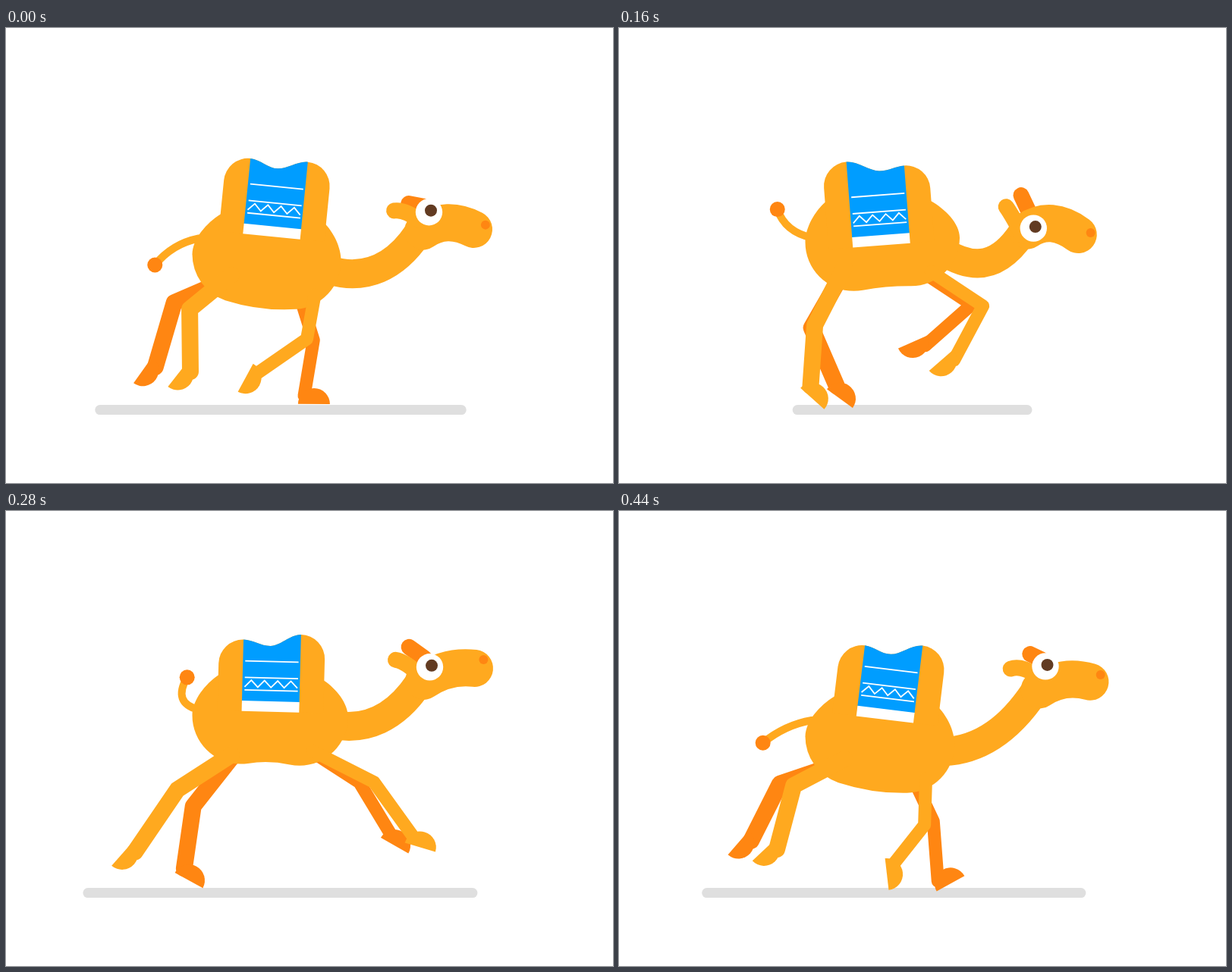
These frames come from a looping animation (800x600 px, 0.48 s). An HTML page with a canvas:

```html
<!DOCTYPE html>
<html lang="en">
<head>
<meta charset="utf-8">
<title>Running camel</title>
<style>
html, body { margin: 0; width: 100%; height: 100%; overflow: hidden; background: #fff; }
canvas { display: block; }
</style>
</head>
<body>
<canvas id="stage" width="800" height="600"></canvas>
<script>
const ctx = document.getElementById('stage').getContext('2d');
const SAND = '#ffa91f', DARK = '#ff8612', BLUE = '#009dff', GREY = '#dfdfdf', BROWN = '#623b22';
const LOOP = 480, STEP = 40, RAD = Math.PI / 180;
let phase = 0;

// Cyclic motion: a mean, then cosine and sine amounts of each harmonic.
const wave = (mean, ...amounts) => amounts.reduce((sum, amount, i) =>
  sum + amount * (i % 2 ? Math.sin : Math.cos)(phase * (1 + (i >> 1))), mean);

function stroke(color, width, trace) {
  ctx.strokeStyle = color;
  ctx.lineWidth = width;
  ctx.beginPath();
  trace();
  ctx.stroke();
}

function fill(color, trace) {
  ctx.fillStyle = color;
  ctx.beginPath();
  trace();
  ctx.fill();
}

const line = (color, width, ...p) => stroke(color, width, () => {
  for (let i = 0; i < p.length; i += 2) ctx.lineTo(p[i], p[i + 1]);
});
const bend = (color, width, x, y, ...rest) => stroke(color, width, () => {
  ctx.moveTo(x, y);
  ctx.quadraticCurveTo(...rest);
});
const dot = (color, x, y, r) => fill(color, () => ctx.arc(x, y, r, 0, 7));

// The trunk carries every other part.
function trunk() {
  const tilt = wave(2.3, 4.25, -4.65, -.85, 1.1);
  const rearY = wave(290, 13.5, -6, -5, -2.6, 0, 7);
  return {
    tilt, a: tilt * RAD,
    lx: 309.5, ly: rearY,
    rx: wave(382.5, -5), ry: rearY + 1.5 * tilt,
    sag: wave(0, 7),
    clothX: 310 + .4 * tilt,
    clothY: wave(275.3, -3, 7.4, -1, -6.8, 0, 4)
  };
}

function body({ a, lx, ly, rx, ry, sag, clothX, clothY }) {
  const R = 64, slope = Math.atan2(ry - ly, rx - lx), dip = sag / 35;
  const left = lx - R, right = rx + R;
  const ay = ly - 53, by = ry - 48;
  const ax = clothX - 32 + (clothY - ay) * Math.sin(a);
  const bx = clothX + 107.7 + (clothY - by) * Math.sin(a);
  const down = Math.PI / 2 + slope;
  fill(SAND, () => {
    ctx.arc(lx, ly, R, Math.PI, down + dip, true);
    ctx.quadraticCurveTo((lx + rx) / 2 - R * Math.sin(slope), (ly + ry) / 2 + R + sag,
      rx + R * Math.cos(down - dip), ry + R * Math.sin(down - dip));
    ctx.arc(rx, ry, R, down - dip, 0, true);
    ctx.bezierCurveTo(right, ry - .38 * (ry - by),
      bx + .5 * (right - bx), by + .22 * (ry - by), bx, by);
    ctx.lineTo(ax, ay);
    ctx.bezierCurveTo(ax + .5 * (left - ax), ay + .22 * (ly - ay),
      left, ly - .38 * (ly - ay), left, ly);
  });
}

function humps({ a, clothX, clothY }) {
  const W = 75.7, H = 102.7, R = 32;
  const h = wave(98.5, -3.9, 14.3, 5.25, -3.6);
  const dx = 37 + .35 * (h - 98), dy = 89 + .6 * (h - 98);
  const k = 13, lift = k * Math.sin(a);
  const saddle = () => {
    ctx.lineTo(0, -h);
    ctx.bezierCurveTo(dx * .35, -h, dx - k, lift - dy, dx, -dy);
    ctx.bezierCurveTo(dx + k, -dy - lift, W - .35 * (W - dx), -H, W, -H);
  };
  ctx.save();
  ctx.translate(clothX, clothY);
  ctx.rotate(a);
  fill(SAND, () => {
    ctx.moveTo(-R, 0);
    ctx.arc(0, R - h, R, Math.PI, 1.5 * Math.PI);
    saddle();
    ctx.arc(W, R - H, R, -Math.PI / 2, 0);
    ctx.lineTo(W + R, 0);
  });
  fill(BLUE, () => {
    saddle();
    ctx.lineTo(W, -13);
    ctx.lineTo(0, -13);
  });
  fill('#fff', () => ctx.rect(0, -13.7, W, 13.7));
  ctx.lineCap = 'butt';
  ctx.lineJoin = 'miter';
  for (const v of [66.3, 44.5, 28]) line('#fff', 1.8, 3, -v, 73.3, -v);
  stroke('#fff', 1.8, () => {
    for (let i = 0; i < 9; i++) ctx.lineTo(3 + i * 8.7, i % 2 ? -41 : -32);
  });
  ctx.restore();
}

function tail({ ly }) {
  const y = ly + wave(-13, -8, 3);
  const x = wave(205.7, -26.4, 0, 17, 1.9), ballY = wave(265, 52.4, 0, -4.9, 2.5);
  bend(SAND, 10, 254, y, 219, y + .2 * (ballY - y), x, ballY);
  dot(DARK, x, ballY, 10);
}

function head({ ry }) {
  const sx = wave(614.5, 2, -9.5), sy = wave(245.3, 18.7, 51.4, 1.5, 8.4, 0, 4);
  const nod = wave(-6, 3.6, 15.4);
  const jx = sx - 67, jy = sy - nod;
  const ex = sx - 59, ey = sy - wave(12, 10.8, 2);

  const farTurn = wave(41.5, -9.5, 14.7, -9.5, -6.6, 0, -12) * RAD, farLen = wave(36, -7, 8);
  const fx = -farLen * Math.cos(farTurn), fy = -farLen * Math.sin(farTurn);
  line(DARK, 21, ex + fx, ey + fy, ex + .3 * fx + 1, ey + .3 * fy - 4);

  const base = ry + wave(13, 0, 7), rise = jy - base;
  stroke(SAND, 38, () => {
    ctx.moveTo(428, base);
    ctx.bezierCurveTo(463 - .2 * rise, base + 40 + .52 * rise, jx - 37, jy + 48, jx - 7, jy + 3.5);
  });
  bend(SAND, 49, jx, jy, jx + 31, jy - 21, sx, sy);

  const turn = wave(18.5, -4.8, 17.6, -11.5, 4.3) * RAD;
  const nx = -46 * Math.cos(turn), ny = -46 * Math.sin(turn);
  bend(SAND, 21, ex + nx, ey + ny, ex + nx / 2 - 10, ey + ny / 2 - 3, ex - 14, ey + 10);

  dot('#fff', ex, ey, 17.7);
  dot(BROWN, ex + 2.5, ey - 2, 8);
  const sniff = (1.6 * nod - 17) * RAD;
  dot(DARK, sx + 16.5 * Math.cos(sniff), sy + 16.5 * Math.sin(sniff), 6);
}

function leg(color, width, hip, knee, ankle, turn) {
  const a = turn * RAD, c = Math.cos(a), s = Math.sin(a);
  const [x, y] = ankle;
  line(color, width, ...hip, ...knee, x, y);
  fill(color, () => ctx.arc(x + 13 * c - 11 * s, y + 13 * s + 11 * c, 21, a + Math.PI, a + 2 * Math.PI));
}

function farLegs({ tilt, ry }) {
  leg(DARK, 17, [wave(396, -9), ry + 46],
    [wave(445, -29.7, 0, -10), wave(382, 29.5, -3)],
    [wave(440, -37, -56.6, -10, 12.7), wave(445.5, 30.8, -13.6, 8.5, -5.5)],
    wave(63.5, -19, 115, -27, 15, -17, -8));
  leg(DARK, 22, [297, 324 + tilt],
    [wave(237.7, -14.3, 15, -1.7, 5.8), wave(379, -17, 9)],
    [wave(231.5, -24.7, 63, -5, 10.4, -5, -7), wave(454, -20, 11, 9, 1, 4)],
    wave(86, 55, -39, -15.5, -4, 0, 18));
}

function nearLegs({ tilt, ry }) {
  leg(SAND, 22, [297, 320 + tilt],
    [wave(239.5, 2.6, 23), wave(374, -3.3, 18.5)],
    [wave(223, 30, 64, -4, 8, -6), wave(452, -8, 17.6, 9, -6)],
    wave(111, 22, -51, -5, 19));
  leg(SAND, 17, [wave(407, 0, 5), ry + 45],
    [wave(447, -42, 14, -8.5, 5.5, 0, -8), wave(389, 30, -16.5, -9, -2.6, 0, 7)],
    [wave(426, -79.5, -7, -10, 21, -5, -25), wave(452, 17, -18, -14, -3.5, 0, 7)],
    wave(85.5, 31, 73, 2, -7.5));
}

function draw(t) {
  phase = t / LOOP * 2 * Math.PI;
  ctx.fillStyle = '#fff';
  ctx.fillRect(0, 0, 800, 600);
  ctx.lineCap = ctx.lineJoin = 'round';
  const core = trunk();
  line(GREY, 13, wave(145.8, -20, 66, -2, -24.5), 503.6, wave(590.7, 9.5, -42.4, 0, 13), 503.6);
  farLegs(core);
  tail(core);
  head(core);
  body(core);
  nearLegs(core);
  humps(core);
}

function tick() {
  const now = performance.now() + .5;
  draw(Math.floor(now / STEP) * STEP % LOOP);
  requestAnimationFrame(tick);
}
tick();
</script>
</body>
</html>
```
